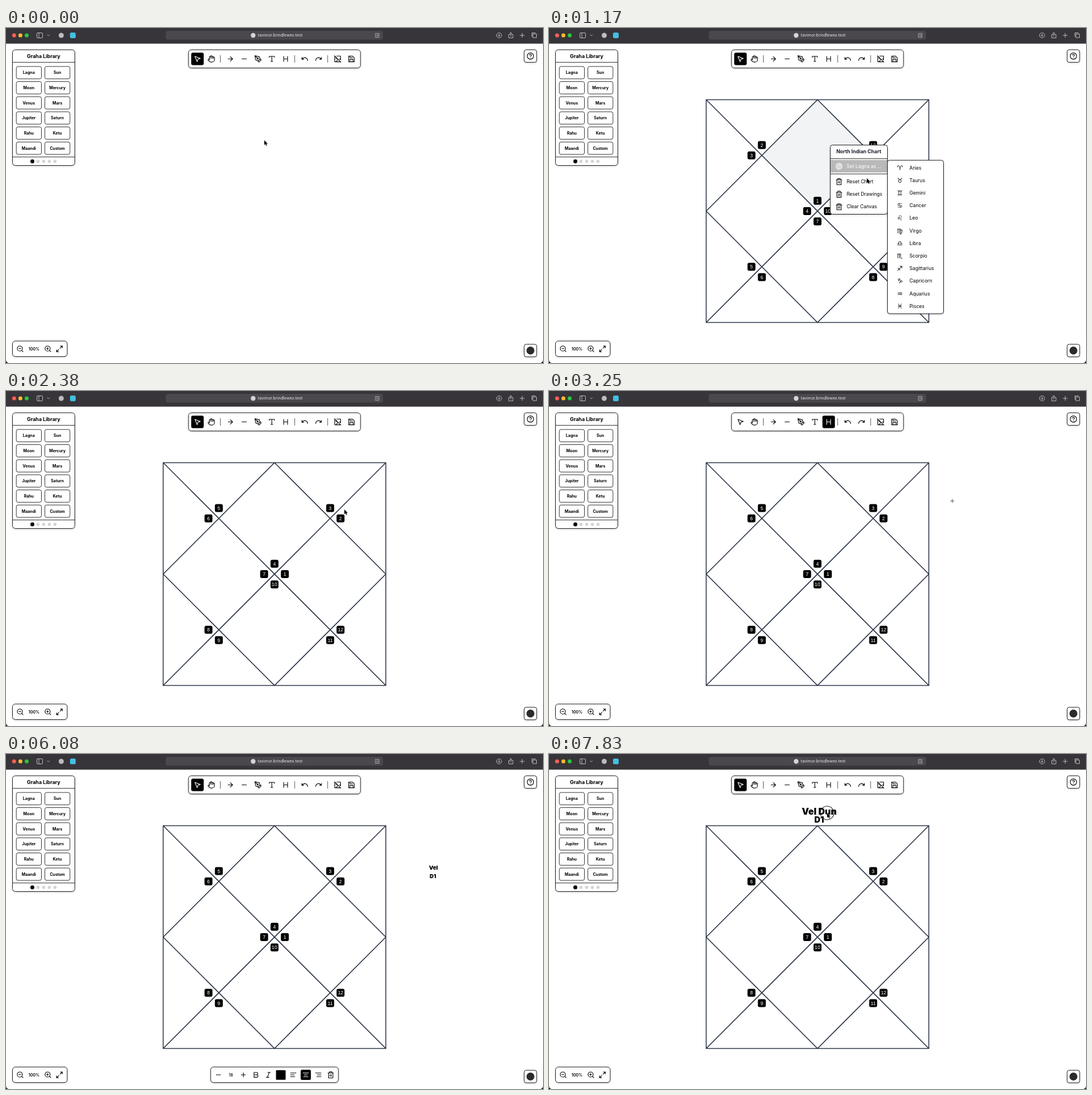
These frames come from a looping animation (948x591 px, 8 s). An HTML page:

```html
<!DOCTYPE html>
<html lang="en">
<head>
<meta charset="utf-8">
<title>Chart editor</title>
<style>
  html, body { margin: 0; width: 100%; height: 100%; overflow: hidden; background: #fff; }
  svg { display: block; width: 100%; height: 100%; font-family: Inter, Roboto, sans-serif; cursor: default; }
  text { white-space: pre; }
  .panel { fill: #fff; stroke: #222; filter: drop-shadow(0 1px 1.5px rgba(0, 0, 0, .22)); }
  .icon { fill: none; stroke: currentColor; stroke-width: 2; stroke-linecap: round; stroke-linejoin: round; }
  .chrome { fill: none; stroke: #bdbbc0; stroke-linecap: round; stroke-linejoin: round; }
  .rule { stroke: #333; }
  .label { font-family: "Liberation Sans", Arial, sans-serif; }
  .zodiac { font-family: "DejaVu Sans", sans-serif; }
</style>
</head>
<body>
<svg id="stage" viewBox="0 0 948 591" preserveAspectRatio="none"></svg>
<script>
const LOOP = 8000;
const stage = document.getElementById('stage');

// Icons live on a 24-unit grid.
const ring = (x, y, r) => `M${x - r} ${y}a${r} ${r} 0 1 0 ${2 * r} 0a${r} ${r} 0 1 0 ${-2 * r} 0`;
const lens = ring(11, 11, 8) + 'M21 21l-4.3-4.3M8 11h6';
const lines = (...rows) => rows.map(([x, w], i) => `M${x} ${6 + i * 6}h${w}`).join('');
const ICONS = {
  pointer: 'M4 4l17 6.500-7.500 2.500-2.500 7.800z',
  hand: 'M18 11V6a2 2 0 0 0-4 0V4a2 2 0 0 0-4 0v2a2 2 0 0 0-4 0v8M10 10V6M14 10V6M18 8a2 2 0 1 1 4 0v6a8 8 0 0 1-8 8h-2q-4 0-6-2.300L2.400 16a2 2 0 0 1 2.800-2.800L7 15',
  arrow: 'M5 12h14M12 5l7 7-7 7',
  minus: 'M5 12h14',
  plus: 'M5 12h14M12 5v14',
  pen: 'M15 22l-3-3 7-7 3 3zM18 13L16.500 5.500 2 2l3.500 14.500L13 18M2 2l7.500 7.500' + ring(11, 11, 2),
  type: 'M12 4v16M4 7V4h16v3M9 20h6',
  heading: 'M6 12h12M6 20V4M18 20V4',
  undo: 'M3 7v6h6M21 17a9 9 0 0 0-15-6.700L3 13',
  redo: 'M21 7v6h-6M3 17a9 9 0 0 1 15-6.700L21 13',
  imageOff: 'M2 2l20 20M10.400 10.400a2 2 0 1 1-2.800-2.800M13.500 13.500L6 21M18 12l3 3M3 4v17h17M21 15V3H9',
  save: 'M15 3l6 6v12H3V3zM17 21v-8H7v8M7 3v5h8',
  help: ring(12, 12, 10) + 'M9 9a3 3 0 0 1 6 1q0 2-3 3M12 17h0',
  zoomOut: lens,
  zoomIn: lens + 'M11 8v6',
  expand: 'M15 3h6v6M9 21H3v-6M21 3l-7 7M3 21l7-7',
  bold: 'M6 12h9a4 4 0 0 1 0 8H6V4h8a4 4 0 0 1 0 8',
  italic: 'M19 4h-9M14 20H5M15 4L9 20',
  left: lines([3, 18], [3, 12], [3, 14]),
  center: lines([3, 18], [7, 10], [5, 14]),
  right: lines([3, 18], [9, 12], [7, 14]),
  trash: 'M3 6h18M5 6v16h14V6M8 6V2h8v4M10 11v6M14 11v6',
  target: ring(12, 12, 10) + ring(12, 12, 6) + ring(12, 12, 2)
};

const text = (x, y, str, size, { weight = 400, anchor = 'middle', attrs = '' } = {}) =>
  `<text x="${x}" y="${y + size * .36}" font-size="${size}" font-weight="${weight}" text-anchor="${anchor}" ${attrs}>${str}</text>`;
const icon = (name, x, y, size = 13.5, attrs = '') =>
  `<g ${attrs} transform="translate(${x - size / 2} ${y - size / 2}) scale(${size / 24})"><path class="icon" d="${ICONS[name]}"/></g>`;
const box = (x, y, w, h, r = 5, attrs = 'class="panel"') =>
  `<rect x="${x}" y="${y}" width="${w}" height="${h}" rx="${r}" ${attrs}/>`;
const path = (d, attrs) => `<path d="${d}" ${attrs}/>`;
const dot = (x, y, r, fill) => `<circle cx="${x}" cy="${y}" r="${r}" fill="${fill}"/>`;
const group = (id, content) => `<g id="${id}">${content}</g>`;

function browserBar() {
  return box(0, 0, 948, 27.6, 0, 'fill="#37353a"') +
    ['#ff5f57', '#febc2e', '#28c840'].map((c, i) => dot(14.3 + i * 11.1, 13, 3.5, c)).join('') +
    box(54.5, 8.5, 10, 9, 1.5, 'class="chrome"') + path('M58 8.500v9M73 12l1.800 1.800 1.800-1.800', 'class="chrome"') +
    dot(97.5, 13, 4.5, '#bdbbc0') + box(113, 8, 10, 10, 2.5, 'fill="#43bfe0"') +
    box(282, 5, 383.5, 15.5, 4, 'fill="#4a484d"') + dot(436.3, 13, 4.2, '#d5d4d7') +
    text(444.5, 12.9, 'tavimor.brindlewex.test', 7.2, { anchor: 'start', attrs: 'fill="#e8e7ea"' }) +
    path('M652.500 9.500h6v7h-6zM654 12h3M654 14h3', 'class="chrome" stroke-width=".8"') +
    path(ring(870.5, 13, 4.5) + 'M870.500 10.500V15l-1.700-1.700M870.500 15l1.700-1.700', 'class="chrome"') +
    path('M889.500 11.500h-2v6h7.500v-6h-2M891.200 14.500V8l-2 2M891.200 8l2 2', 'class="chrome"') +
    path('M907.500 13h7.500M911.200 9.200v7.500', 'class="chrome"') +
    path('M930.500 10.500h6V17h-6zM928.500 15V8.500h6', 'class="chrome"');
}

function library() {
  const names = ['Lagna', 'Sun', 'Moon', 'Mercury', 'Venus', 'Mars', 'Jupiter', 'Saturn', 'Rahu', 'Ketu', 'Maandi', 'Custom'];
  const buttons = names.map((name, i) => {
    const x = 18.2 + (i % 2) * 50.4, y = 67.9 + (i >> 1) * 26.65;
    return box(x, y, 44.3, 21.8, 3, 'fill="#fff" stroke="#333"') + text(x + 22.1, y + 11, name, 7, { weight: 700 });
  });
  const dots = [0, 1, 2, 3, 4].map(i => dot(46.5 + i * 10, 235.3, i ? 2.8 : 3.5, i ? '#d4d4d4' : '#000'));
  return box(11.5, 38.5, 110, 204) + text(66.5, 49.6, 'Graha Library', 8.9, { weight: 700 }) +
    path('M11.500 60.500h110M11.500 227.500h110', 'class="rule"') + buttons.join('') + dots.join('');
}

const toolX = {};
function toolbar() {
  let x = 338, content = '';
  for (const name of 'pointer hand | arrow minus pen type heading | undo redo | imageOff save'.split(' ')) {
    if (name === '|') {
      content += path(`M${x - 8.4} 48v13`, 'stroke="#555"');
      x += 9.3;
    } else {
      content += icon(name, x, 54.5, 13.5, `id="${name}"`);
      toolX[name] = x;
      x += 24.4;
    }
  }
  return box(322.2, 38.5, 303.6, 32) + box(0, 43.5, 22, 22, 3, 'id="active"') + content;
}

const corners = () =>
  box(11.5, 552.2, 96.5, 27.4) + icon('zoomOut', 25, 566) + text(49.5, 566, '100%', 7.1, { weight: 600 }) +
  icon('zoomIn', 74, 566) + icon('expand', 94.3, 566) +
  box(914.8, 38.5, 22, 22, 3.5) + icon('help', 925.8, 49.5) +
  box(914.8, 558, 22, 22, 3.5) + dot(925.8, 569, 7, '#2b2b2b') +
  path('M0 585v6h6q-6 0-6-6M948 585v6h-6q6 0 6-6', 'fill="#000"');

// Houses run anticlockwise; every third one touches the middle, the others a crossing between two sides.
const CHART = { x: 474, y: 323, half: 196.5 };
const SIDES = [[0, -1], [-1, 0], [0, 1], [1, 0]];
function houseCenter(i) {
  const side = Math.floor(i / 3), a = SIDES[side], b = SIDES[(side + 1) % 4];
  const facing = i % 3 === 2 ? b : a, reach = i % 3 ? CHART.half / 2 : 0;
  return [0, 1].map(k => (k ? CHART.y : CHART.x) + reach * (a[k] + b[k]) + facing[k] * 18.3);
}
function chart() {
  const { x, y, half: h } = CHART;
  const diamond = (cy, r) => `M${x} ${cy - r}l${r} ${r} ${-r} ${r} ${-r} ${-r}z`;
  const labels = Array.from({ length: 12 }, (_, i) => {
    const [cx, cy] = houseCenter(i);
    return box(cx - 7, cy - 7, 14, 14, 3, '') + text(cx, cy, '', 8.8, { attrs: 'class="label sign" fill="#fff"' });
  });
  return path(diamond(y - h / 2, h / 2), 'id="house" fill="#f1f3f5"') +
    path(`M${x - h} ${y - h}h${2 * h}v${2 * h}h${-2 * h}zl${2 * h} ${2 * h}m0 ${-2 * h}l${-2 * h} ${2 * h}` + diamond(y, h),
      'fill="none" stroke="#2d3748" stroke-width="1.6"') + labels.join('');
}

const ROW = 22.2;
function menu() {
  const row = (name, y, label) => icon(name, 512, y, 13) + text(525.5, y, label, 8.5, { anchor: 'start' });
  return box(496.5, 206.5, 101, 122, 4) + text(546.8, 218.2, 'North Indian Chart', 8.8, { weight: 700, attrs: 'fill="#1a202c"' }) +
    path('M496.500 230.500h101M496.500 257.500h101', 'class="rule"') +
    box(497, 232.8, 100, ROW, 0, 'id="lagnaBg"') +
    `<g id="lagna" fill="currentColor">${row('target', 243.9, 'Set Lagna as ...')}</g>` +
    ['Reset Chart', 'Reset Drawings', 'Clear Canvas'].map((label, i) => row('trash', 271 + i * ROW, label)).join('');
}
function submenu() {
  const signs = ['Aries', 'Taurus', 'Gemini', 'Cancer', 'Leo', 'Virgo', 'Libra', 'Scorpio', 'Sagittarius', 'Capricorn', 'Aquarius', 'Pisces'];
  return box(597.5, 233.3, 99, 270.7, 4) + signs.map((name, i) => {
    const y = 246.5 + i * ROW;
    return box(598, y - ROW / 2, 98, ROW, 0, 'class="signBg" opacity="0"') + '<g class="signRow">' +
      text(619.5, y, String.fromCharCode(0x2648 + i) + '\uFE0E', 11.5, { attrs: 'class="zodiac"' }) +
      text(636.3, y, name, 8.6, { anchor: 'start' }) + '</g>';
  }).join('');
}

function formatBar() {
  const items = 'minus 18 plus bold italic color left center right trash'.split(' ').map((name, i) => {
    const x = 375 + i * 22.03;
    if (name === '18') return text(x, 566, name, 7.1, { weight: 500 });
    if (name === 'color') return box(x - 8.5, 557.7, 17, 17, 1.5, '');
    if (name === 'center') return box(x - 9, 557, 18, 18, 2.5, '') + icon(name, x, 566, 13, 'color="#fff"');
    return icon(name, x, 566, 13);
  });
  return box(361.3, 552.2, 225.5, 27.4) + items.join('');
}

function editor() {
  return box(0, 194.5, 0, 13.5, 0, 'id="selection" fill="#b3d7ff"') +
    text(0, 201, '', 9.6, { weight: 900, attrs: 'class="title"' }) + text(753.7, 215.5, 'D1', 9.6, { weight: 900 }) +
    path('M721.500 206.800h24', 'id="spelling" stroke="#e0443e" stroke-dasharray="1 1"') +
    path('M764.500 195v12', 'id="caret" stroke="#999" stroke-width=".7"');
}

const placed = () =>
  text(0, 0, '', 16, { weight: 900, attrs: 'class="title"' }) + text(0, 14.8, 'D1', 14.5, { weight: 900 });

function cursor() {
  const shape = (kind, d, attrs) => path(d, `class="shape" data-kind="${kind}" ${attrs}`);
  return '<circle id="ring" fill="none" stroke="#222" stroke-width="1.100"/>' +
    shape('arrow', 'M0 0v8.600l2-1.800 1.300 3 1.400-.6-1.300-2.900h2.700z', 'stroke="#fff" stroke-width=".7" paint-order="stroke"') +
    shape('hand', 'M-1 5V0q1-1 2 0v3l3 1q1 3-1 5H0L-3 5z', 'fill="#fff" stroke="#222" stroke-width=".8" stroke-linejoin="round"') +
    shape('cross', 'M-3.500 0h7M0-3.500v7', 'stroke="#444" stroke-width=".9"') +
    shape('beam', 'M-2-4.500l2 1 2-1M0-3.500v7M-2 4.500l2-1 2 1', 'fill="none" stroke="#222" stroke-width=".9"');
}

stage.innerHTML = box(0, 0, 948, 591, 0, 'fill="#fff"') + browserBar() +
  group('chart', chart()) + group('placed', placed()) + group('editor', editor()) +
  library() + toolbar() + corners() + group('formatBar', formatBar()) +
  group('menu', menu()) + group('submenu', submenu()) + group('cursor', cursor());

const $ = id => document.getElementById(id);
const all = selector => [...stage.querySelectorAll(selector)];
const signs = all('.sign'), signBgs = all('.signBg'), signRows = all('.signRow'), shapes = all('.shape');
const [placedTitle, editorTitle] = all('.title');

const clamp = v => Math.max(0, Math.min(1, v));
const ease = v => v * v * (3 - 2 * v);
const show = (el, on) => el.setAttribute('display', on ? 'inline' : 'none');
const within = (t, from, to) => t >= from && t < to;

const CHART_IN = 80, MENU = 960, LAGNA = 1130, PICK = 2170, TOOL = 2660, PLACE = 3440, FORMAT = 4150, EDIT = 4300,
  SELECT = 4790, TYPE = 5710, TYPED = 6710, COMMIT = 6930, DRAG = 7180;
const CLICKS = [PICK, TOOL, PLACE, FORMAT, EDIT, COMMIT];
const ENTER = [1420, 1674, 1750, PICK];
const NAME = 'Vel Dun', KEY_GAP = 125;

// Pointer moves: start, end, then the place reached.
const MOVES = [
  [40, 830, 496, 207], [1000, 1170, 561, 265], [1170, 1450, 648, 264], [1560, 1760, 666, 311],
  [2200, 2620, 493, 54], [2740, 3200, 712, 194], [3450, 3710, 814, 211], [3880, 4130, 772, 203],
  [4400, 4640, 785, 199], [SELECT, 5190, 717, 201], [TYPED, 6890, 810, 220], [7000, 7150, 766, 204],
  [DRAG, 7520, 522, 113], [7520, 7800, 491, 104]
];
const pointerAt = t => MOVES.reduce(([x, y], [from, to, nextX, nextY]) => {
  const k = ease(clamp((t - from) / (to - from)));
  return [x + (nextX - x) * k, y + (nextY - y) * k];
}, [456, 198]);

function pointerKind(t, x, y, tool) {
  if (within(t, TYPE, TYPED)) return 'none';
  if (y < 71 || (within(t, LAGNA, PICK) && x > 597)) return 'hand';
  if (tool === 'heading') return 'cross';
  return within(t, EDIT, TYPE) ? 'beam' : 'arrow';
}

function renderChart(t) {
  const picked = t >= PICK;
  show($('chart'), t >= CHART_IN);
  show($('house'), !picked);
  signs.forEach((el, i) => el.textContent = (i + (picked ? 3 : 0)) % 12 + 1);
}

function renderMenus(t) {
  show($('menu'), within(t, MENU, PICK));
  show($('submenu'), within(t, LAGNA, PICK));
  $('lagnaBg').setAttribute('opacity', clamp((t - LAGNA) / 150));
  $('lagna').setAttribute('color', t >= LAGNA ? '#fff' : '#000');
  ENTER.slice(0, -1).forEach((from, i) => {
    const to = ENTER[i + 1], row = i + 1;
    signBgs[row].setAttribute('opacity', clamp((t - from) / 150) * (1 - clamp((t - to) / 55)));
    signRows[row].setAttribute('fill', within(t, from, to) ? '#fff' : '#000');
  });
}

function renderHeading(t, x) {
  const typed = t >= TYPE, editing = within(t, EDIT, COMMIT);
  show($('formatBar'), within(t, FORMAT, COMMIT));
  show($('placed'), t >= PLACE && !editing);
  show($('editor'), editing);
  placedTitle.textContent = editorTitle.textContent =
    typed ? NAME.slice(0, 1 + (t - TYPE) / KEY_GAP) : 'Rashi Chart';
  editorTitle.setAttribute('x', typed ? 754.5 : 749.5);
  show($('spelling'), !typed);
  show($('caret'), t < 4870);

  const edge = Math.max(720, Math.min(779, x));
  $('selection').setAttribute('x', edge);
  $('selection').setAttribute('width', within(t, SELECT, TYPE) ? 779 - edge : 0);

  const [grabX, grabY] = pointerAt(Math.max(t - 20, DRAG));
  $('placed').setAttribute('transform', `translate(${grabX - 14} ${grabY - 3})`);
}

function renderPointer(t, x, y, tool) {
  const kind = pointerKind(t, x, y, tool);
  shapes.forEach(el => show(el, el.dataset.kind === kind));
  $('cursor').setAttribute('transform', `translate(${x} ${y})`);
  const presses = [...CLICKS.map(at => [at, at + 110]), [SELECT, 5200], [DRAG, LOOP]];
  const press = presses.find(([from, to]) => within(t, from, to));
  $('ring').setAttribute('r', press ? 12 * clamp((t - press[0]) / 50) : 0);
}

function render(t) {
  const [x, y] = pointerAt(t);
  const tool = within(t, TOOL, PLACE) ? 'heading' : 'pointer';
  $('active').setAttribute('x', toolX[tool] - 11);
  ['pointer', 'heading'].forEach(name => $(name).setAttribute('color', name === tool ? '#fff' : '#000'));
  renderChart(t);
  renderMenus(t);
  renderHeading(t, x);
  renderPointer(t, x, y, tool);
}

const start = performance.now();
function tick() {
  render((performance.now() - start) % LOOP);
  requestAnimationFrame(tick);
}
tick();
</script>
</body>
</html>
```
